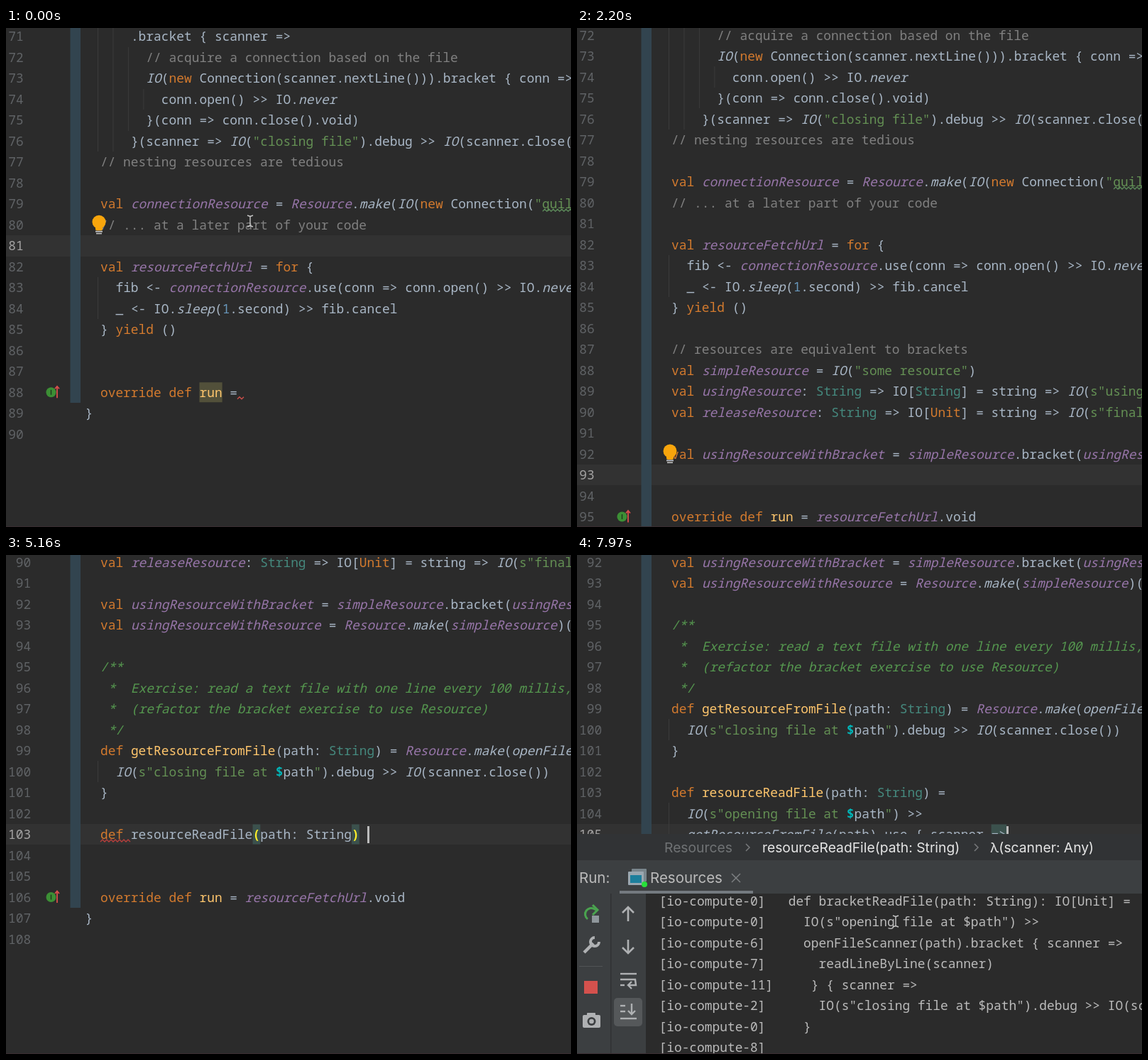
Recreate the animation shown at these times as an HTML page with a canvas. Size 796 by 703 pixels, loop 8000 ms.

```html
<!DOCTYPE html>
<html lang="en">
<head>
<meta charset="utf-8">
<title>Code editor</title>
<style>
html, body { margin: 0; width: 100%; height: 100%; overflow: hidden; background: #2b2b2b; }
canvas { display: block; }
</style>
</head>
<body>
<canvas id="stage" width="796" height="703"></canvas>
<script>
const g = document.getElementById('stage').getContext('2d');
const LOOP = 8000, FIRST = 71, ROW = 29.5, CH = 10.73, LEFT = 111.5;
const mono = (face = '500') => face + ' 17.88px "Noto Sans Mono", "DejaVu Sans Mono", monospace';
const UI = 'Inter, "Open Sans", sans-serif';
const C = { bg: '#2b2b2b', panel: '#3c3f41', text: '#a9b7c6', ui: '#bbbbbb', icon: '#8f979c', match: '#3b514d' };

const base = [
  '      .bracket { scanner =>',
  '        // acquire a connection based on the file',
  '        IO(new Connection(scanner.nextLine())).bracket { conn =>',
  '          conn.open() >> IO.never',
  '        }(conn => conn.close().void)',
  '      }(scanner => IO("closing file").debug >> IO(scanner.close()))',
  '  // nesting resources are tedious',
  '',
  '  val connectionResource = Resource.make(IO(new Connection("quil',
  '  // ... at a later part of your code',
  '',
  '  val resourceFetchUrl = for {',
  '    fib <- connectionResource.use(conn => conn.open() >> IO.never).start',
  '    _ <- IO.sleep(1.second) >> fib.cancel',
  '  } yield ()',
  '', '',
  '  override def run =',
  '}', ''
];

// [time, row, blank lines inserted, text typed, duration, characters already there]
const edits = [
  [290, 88, 0, '  override def run = resourceFetchUrl.void', 280, 20],
  [580, 85, 0], [640, 84, 0], [700, 83, 0], [800, 82, 0],
  [1000, 87, 1, '  // resources are equivalent to brackets', 170],
  [1170, 88, 1, '  val simpleResource = IO("some resource")', 140],
  [1310, 89, 1, '  val usingResource: String => IO[String] = string => IO(s"using $string").debug', 280],
  [1600, 90, 1, '  val releaseResource: String => IO[Unit] = string => IO(s"finalizing $string").void', 280],
  [1900, 91, 2],
  [1900, 92, 0, '  val usingResourceWithBracket = simpleResource.bracket(usingResource)(releaseResource)', 220],
  [2130, 93, 1],
  [2300, 93, 0, '  val usingResourceWithResource = Resource.make(simpleResource)(releaseResource)', 220],
  [2600, 94, 6],
  [2600, 95, 0, '  /**'], [2600, 97, 0, '   *'], [2600, 98, 0, '   */'],
  [2650, 96, 0, '   *  Exercise: read a text file with one line every 100 millis, using Resource', 320, 6],
  [3000, 97, 0, '   *  (refactor the bracket exercise to use Resource)', 364, 6],
  [3400, 99, 0, '  def getResourceFromFile(path: String) = Resource.make(openFileScanner(path)) { scanner =>', 500],
  [3950, 100, 2], [3950, 101, 0, '  }'],
  [3950, 100, 0, '    IO(s"closing file at $path").debug >> IO(scanner.close())', 450],
  [4570, 102, 3],
  [4750, 103, 0, '  def resourceReadFile(path: String) =', 420],
  [5300, 104, 4],
  [5300, 104, 0, '    IO(s"opening file at $path") >>', 250],
  [5560, 107, 0, '    }'],
  [5560, 105, 0, '    getResourceFromFile(path).use { scanner =>', 250],
  [5830, 106, 0, '      readLineByLine(scanner)', 180],
  [6340, 110, 0, '  override def run = resourceReadFile("")', 200, 21],
  [7230, 110, 0, '  override def run = resourceReadFile("src/main/scala/Resources.scala").void'],
  [7500, 105, 0]
];
// [time, line number at the top]
const scrolls = [[0, 70.94], [580, 72], [2650, 75], [3450, 80], [4580, 90], [6340, 92]];

// one capture group per style
const TOKENS = new RegExp([
  /(^ +(?:\/\*\*|\*).*)/, /(\/\/.*)/, /("(?=\))|s?"[^"$]*"?)/, /(\$)/,
  /\b(val|def|new|for|yield|override|Unit)\b/, /(?<=def )(\w+)(?=.*=)/, /\b(\d+)/, /\b(String)\b(?=.*=)/,
  /\b(connectionResource|Resource(?=\.)|resourceFetchUrl|simpleResource|usingResource\w*|releaseResource)\b/,
  /(\bIO(?=\()|(?<=\.)(?:make|never|sleep)\b|openFile\w*|getResourceFromFile|readLineByLine|resourceReadFile(?=.*"))/,
  /\w+|./
].map(r => r.source).join('|'), 'g');
const styles = [
  ['#55974f', 'italic 500'], ['#808080'], ['#649054'], ['#00b8bb', 'bold'], ['#d37a2e'], ['#ffc66d'],
  ['#6897bb'], ['#45887d'], ['#9876aa', 'italic 500'], [C.text, 'italic 500']
];

const tree = [
  [2, 'main', 'v'], [3, 'scala', 'v', '#209fc0'], [4, 'com.quilbramot', 'v', 'dot'],
  [5, 'part1recap', '>', 'dot'], [5, 'part2effects', '>', 'dot'], [5, 'part3concurrency', 'v', 'dot'],
  [6, 'Fibers', '', 'object'], [6, 'Resources', '', 'object'],
  [5, 'playground', '>', 'dot'], [5, 'utils', '>', 'dot'], [2, 'test', '>'], [1, 'target', '>', '#c4581d'],
  [1, 'build.sbt', '', 'build'], [0, '.gitignore', '', 'ignore'],
  [0, 'External Libraries', '>', 'books'], [0, 'Scratches and Consoles', '', 'scratch']
];

const output = [
  [3, ''], [1, '   */'], [5, '  def openFileScanner(path: String): IO[Scanner] ='],
  [2, '    IO(new Scanner(new FileReader(new File(path))))'], [9, ''],
  [0, '  def bracketReadFile(path: String): IO[Unit] ='],
  [0, '    IO(s"opening file at $path") >>'],
  [6, '    openFileScanner(path).bracket { scanner =>'],
  [7, '      readLineByLine(scanner)'],
  [11, '    } { scanner =>'],
  [2, '      IO(s"closing file at $path").debug >> IO(scanner.close())'],
  [0, '    }'], [8, '']
];

function box(x, y, w, h, color, r = 0) {
  g.fillStyle = color;
  g.beginPath();
  g.roundRect(x, y, w, h, r);
  g.fill();
}
function disc(x, y, r, color) {
  g.fillStyle = color;
  g.beginPath();
  g.arc(x, y, r, 0, 7);
  g.fill();
}
// points are flat x, y pairs
function line(color, width, ...p) {
  g.strokeStyle = color;
  g.lineWidth = width;
  g.beginPath();
  for (let i = 0; i < p.length; i += 2) g.lineTo(p[i], p[i + 1]);
  g.stroke();
}
function label(s, x, y, color, font) {
  g.fillStyle = color;
  g.font = font;
  g.fillText(s, x, y);
}
function squiggle(x, end, y, color) {
  const p = [];
  for (let i = 0; x <= end; i++, x += 3) p.push(x, y + (i % 2 ? -1.5 : 1.5));
  line(color, 1.3, ...p);
}
const colX = n => LEFT + n * CH;

function build(t) {
  const rows = [...base];
  let cur = 81, caret = -1;
  for (const [at, row, blanks, text, dur = 1, pre] of edits) {
    if (at > t) break;
    const i = row - FIRST;
    rows.splice(i, 0, ...Array(blanks).fill(''));
    cur = row;
    caret = -1;
    if (!text) continue;
    const done = Math.min(1, (t - at) / dur), from = pre ?? text.search(/\S/);
    const n = from + Math.round((text.length - from) * done);
    rows[i] = text.slice(0, n);
    if (done < 1) caret = n;
  }
  return { rows, cur, caret };
}

function codeLine(text, y) {
  for (const m of text.matchAll(TOKENS)) {
    const k = m.slice(1).findIndex(s => s !== undefined);
    const [color, face] = styles[k] || [C.text];
    label(m[0], colX(m.index), y + 6.5, color, mono(face));
  }
}

function bulb(y) {
  disc(131, y - 4, 9.5, '#f8a50c');
  box(126, y + 1, 10, 7, '#f8a50c', 2);
  box(126, y + 8.5, 10, 1.8, '#c4c4c4');
  box(127, y + 11.5, 8, 1.6, '#c4c4c4');
}

function runMark(y) {
  disc(63.5, y, 7, '#3c8f35');
  line('#1f3a1f', 1.5, 63.5, y - 3.5, 63.5, y + 3.5);
  line('#d8504c', 1.8, 72, y + 8, 72, y - 8);
  line('#d8504c', 1.8, 69, y - 5, 72, y - 8.5, 75, y - 5);
}

function editor(t, tree, run) {
  const { rows, cur, caret } = build(t);
  const top = scrolls.filter(s => s[0] <= t).pop()[1];
  const mid = n => 10 + (n - top) * ROW;
  const edge = n => Math.round(mid(n) - ROW / 2);
  const last = FIRST + rows.length - 1, runRow = FIRST + rows.findIndex(r => r.includes('def run'));
  const numEnd = (last > 99 ? 35.3 : 24.7) + (tree ? 12 : 0);

  box(0, edge(cur), 800, edge(cur + 1) - edge(cur), '#323232');
  box(90.5, 0, 14.5, edge(runRow + 1), '#32444f');
  if (t >= 580 && t < 1000) {
    for (let n = cur; n <= 85; n++) box(111, edge(n), n < 85 ? 700 : 129, edge(n + 1) - edge(n), '#164084');
  }
  if (t < 290) box(colX(15), mid(88) - 14, 3 * CH, 28, '#52503a');
  if (run) box(colX(44), mid(105) - 14, 2 * CH, 28, C.match);

  rows.forEach((text, i) => {
    const n = FIRST + i, y = mid(n);
    if (y < -20 || y > 723) return;
    const guides = Math.floor(Math.max(0, text.search(/\S/)) / 2) - 1;
    for (let k = 0; k < guides; k++) box(129 + k * 2 * CH, edge(n), 1, edge(n + 1) - edge(n), '#3b3b3b');
    const num = String(n);
    label(num, numEnd - num.length * CH, y + 6.5, n === cur ? '#a4a3a3' : '#606366', mono());
    codeLine(text, y);
    if (/^  def [^=]+$/.test(text)) squiggle(133, 176, y + 9, '#bc3f3c');
    if (caret >= 0 && n === cur && /\(path: String\) ?$/.test(text)) {
      for (const c of '()') {
        const x = colX(text.indexOf(c));
        box(x, y - 14, CH, 28, C.match);
        label(c, x, y + 6.5, '#ffef28', mono('bold'));
      }
    }
  });

  squiggle(756, 800, mid(79) + 9, '#5c8a5a');
  if (t < 290) squiggle(326, 336, mid(88) + 8, '#d0504c');
  runMark(mid(runRow));
  if (cur > 94 && cur < 99) {
    const y = mid(95);
    line('#626466', 1.6, 63, y - 8, 63, y + 8);
    for (const [dy, end] of [[-6, 79], [0, 75], [6, 79]]) line('#626466', 1.6, 67, y + dy, end, y + dy);
  }
  if (caret < 0 && t < 2300) bulb(mid(cur - 1));
  const col = run ? 46 : caret;
  if (col >= 0) box(Math.round(colX(col)), Math.round(mid(cur)) - 12, 3, 24, '#bbbbbb');
}

function chevron(x, y, down, color = '#b0b3b5') {
  if (down) line(color, 2, x - 7, y - 4, x, y + 4, x + 7, y - 4);
  else line(color, 2, x - 4, y - 7, x + 4, y, x - 4, y + 7);
}

function treeIcon(kind, x, y) {
  if (kind === 'object') {
    disc(x + 13, y, 12, '#c8952f');
    label('O', x + 7.5, y + 5.3, '#4a3a17', '600 15px ' + UI);
  } else if (kind === 'build' || kind === 'ignore') {
    box(x + 9, y - 12, 11, 23, C.icon, 1);
    box(x + 3, y - 5, 8, 16, C.icon, 1);
    if (kind === 'build') disc(x + 18, y + 6, 7, '#e3b778');
    else {
      disc(x + 18, y + 6, 8, '#45463d');
      g.strokeStyle = '#b0b3b5';
      g.lineWidth = 2;
      g.beginPath();
      g.arc(x + 18, y + 6, 5.5, 0, 7);
      g.stroke();
      line('#b0b3b5', 2, x + 14, y + 10, x + 22, y + 2);
    }
  } else if (kind === 'books') {
    ['#8f979c', '#62b543', '#8f979c', '#2fa8cc'].forEach((c, i) =>
      box(x + i * 6.5, y - (i === 3 ? 7 : 11), 4, i === 3 ? 16 : 20, c));
  } else if (kind === 'scratch') {
    box(x, y - 13, 18, 18, C.icon, 1);
    line('#3c3f41', 2, x + 3, y - 9, x + 8, y - 5, x + 3, y - 1);
    disc(x + 17, y + 4, 10, C.panel);
    disc(x + 17, y + 4, 9, '#15a9df');
    line('#e8f4f8', 2, x + 17, y - 2, x + 17, y + 5, x + 21, y + 5);
  } else {
    const color = kind && kind[0] === '#' ? kind : C.icon;
    box(x, y - 10, 11, 6, color, 1);
    box(x, y - 7, 25, 17, color, 1);
    if (kind === 'dot') disc(x + 12.5, y + 1.5, 4, C.panel);
  }
}

function projectPanel() {
  g.save();
  g.beginPath();
  g.rect(0, 0, 370, 703);
  g.clip();
  box(0, 0, 370, 703, C.panel);
  tree.forEach(([level, name, arrow, kind], i) => {
    const y = 21 + 31.32 * i, x = 32 * level;
    const tint = { 7: '#0d293e', 11: '#47463c', 13: '#47463c' }[i];
    if (tint) box(0, y - 15.7, 370, 31.4, tint);
    if (arrow) chevron(11 + x, y, arrow === 'v');
    treeIcon(kind, 35 + x, y);
    label(name, 65 + x, y + 7.5, { 7: '#6ba0c4', 11: '#86860f' }[i] || C.ui, '20.5px ' + UI);
  });
  g.restore();
  box(370, 0, 1, 703, '#323232');
  box(478, 685, 340, 15, '#595b5c', 7);
}

function toolIcons() {
  // left column
  g.strokeStyle = '#4aa34f';
  g.lineWidth = 3;
  g.beginPath();
  g.arc(20, 506, 8.5, 2.2, 5.2);
  g.lineTo(27, 500);
  g.stroke();
  line('#4aa34f', 3, 22, 493, 29, 500, 22, 507);
  box(21, 508, 10, 10, C.icon);
  line('#afb1b3', 4.5, 10, 560, 23, 547);
  g.lineWidth = 4;
  g.beginPath();
  g.arc(25, 545, 6, 0, 4.7);
  g.stroke();
  box(3, 579, 33, 1, '#515456');
  box(10, 600, 19, 18, '#d4514d');
  box(8, 648, 25, 18, '#afb1b3', 2);
  box(14, 645, 12, 5, '#afb1b3', 1);
  disc(20.5, 657, 6, C.panel);
  disc(20.5, 657, 3.3, '#afb1b3');
  // right column
  const c = '#afb1b3';
  line(c, 2.6, 72, 516, 72, 497);
  line(c, 2.6, 64, 504, 72, 496, 80, 504);
  line(c, 2.6, 72, 542, 72, 561);
  line(c, 2.6, 64, 553, 72, 561, 80, 553);
  line(c, 2.4, 61, 590, 84, 590);
  line(c, 2.4, 61, 598, 82, 598, 83, 606, 73, 606);
  line(c, 2.4, 77, 601, 72, 606, 77, 611);
  line(c, 2.4, 61, 606, 67, 606);
  box(52, 624, 40, 40, '#55585a', 5);
  line(c, 2.4, 61, 635, 68, 635);
  line(c, 2.4, 61, 643, 68, 643);
  line(c, 2.4, 61, 653, 84, 653);
  line(c, 2.4, 77, 632, 77, 647);
  line(c, 2.4, 72, 642, 77, 647, 82, 642);
}

function runPanel(t) {
  box(0, 393, 796, 310, C.bg);
  box(0, 393, 796, 37, '#313335');
  const crumb = '19.3px ' + UI;
  label('Resources', 123, 418.5, '#707375', crumb);
  label('resourceReadFile(path: String)', 261, 418.5, '#e6e6e6', crumb);
  label('λ(scanner: Any)', 582, 418.5, '#e6e6e6', crumb);
  for (const x of [241, 563]) line('#77797b', 1.5, x - 3, 407, x + 2, 412, x - 3, 417);

  box(0, 430, 796, 47, C.panel);
  label('Run:', 3, 461.5, C.ui, '20.5px ' + UI);
  box(77, 442, 21, 18, '#79858c', 1);
  box(72, 446, 22, 19, '#9aa7b0', 1);
  box(75, 451, 16, 11, '#1d7f9c');
  disc(95, 464, 4, '#27e03a');
  label('Resources', 103, 461.5, C.ui, '20.5px ' + UI);
  line('#7d8082', 1.5, 218, 449, 230, 461);
  line('#7d8082', 1.5, 230, 449, 218, 461);
  box(60, 473, 188, 4, '#747a80');

  box(0, 477, 97, 226, C.panel);
  box(47, 477, 1.5, 226, '#303234');
  toolIcons();

  g.save();
  g.beginPath();
  g.rect(97, 477, 699, 226);
  g.clip();
  const shown = t < 7600 ? 3 : t < 7900 ? 10 : output.length;
  output.slice(Math.max(0, shown - 8), shown).forEach(([id, text], i) =>
    label(`[io-compute-${id}] ${text}`, 115.5, 493.5 + i * ROW, C.ui, mono()));
  g.restore();
}

function pointer(x, y) {
  line('#c8c8c8', 1.4, x, y - 7, x, y + 7);
  for (const s of [-1, 1]) line('#c8c8c8', 1.4, x - 4, y + 8 * s, x, y + 6.5 * s, x + 4, y + 8 * s);
}

function draw(now) {
  const ms = now % LOOP;
  const t = ms < 290 ? 0 : 290 + 147.5 * Math.floor((ms - 280) / 147.5);
  const showTree = t >= 6600 && t < 7230, run = t >= 7500;
  box(0, 0, 796, 703, C.bg);
  g.save();
  if (showTree) g.translate(364, 0);
  editor(t, showTree, run);
  g.restore();
  if (showTree) projectPanel();
  if (run) {
    runPanel(t);
    pointer(449, 516);
  } else if (t < 1000) {
    const p = Math.max(0, Math.min(1, (t - 290) / 440));
    pointer(344 - 16 * p, 272 - 40 * p);
  }
  box(0, 702, 796, 1, '#392d31');
  requestAnimationFrame(draw);
}
requestAnimationFrame(draw);
</script>
</body>
</html>
```
